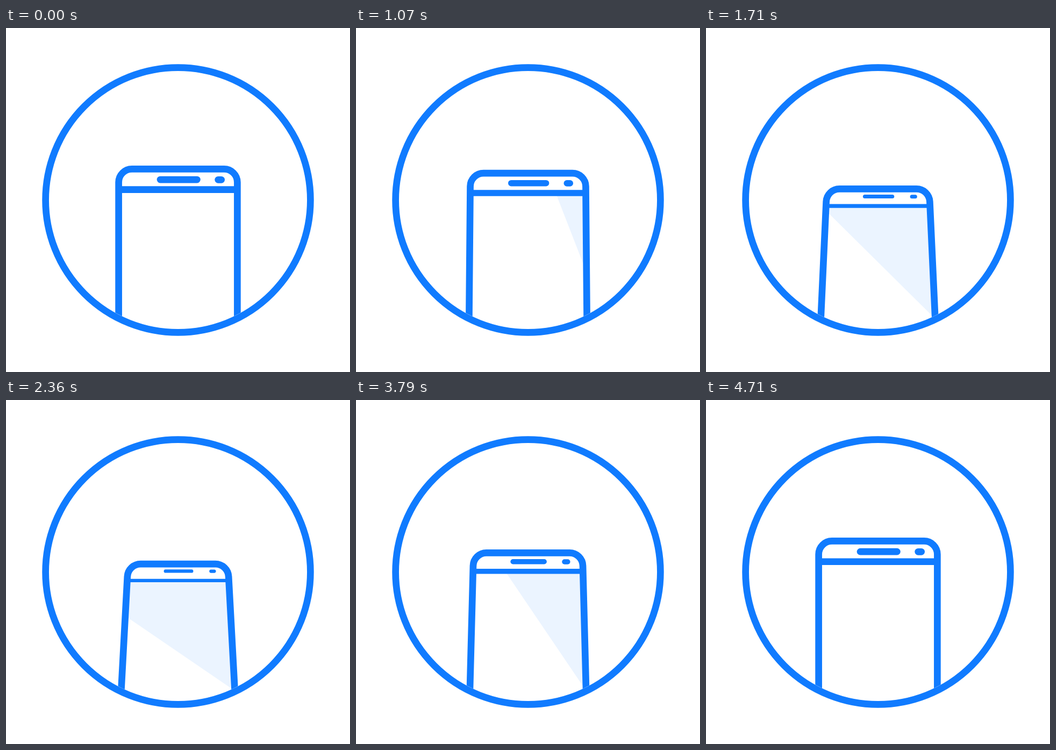
Write an HTML page with a canvas that moves like this. It is 640x640 px and loops after 4780 ms.

```html
<!DOCTYPE html>
<html lang="en">
<head>
<meta charset="utf-8">
<title>Tilting phone</title>
<style>
  html, body { margin: 0; height: 100%; overflow: hidden; background: #fff; }
  canvas { display: block; width: 640px; height: 640px; }
</style>
</head>
<body>
<canvas id="stage" width="640" height="640"></canvas>
<script>
const ctx = document.getElementById('stage').getContext('2d');
const LOOP = 4780, HALF = LOOP / 2, STEP = LOOP / 67;
const BLUE = '#107bff', LIGHT = '#ebf4ff', STROKE = 12.7, BOTTOM = 628;

const lerp = (a, b, k) => a + (b - a) * k;
const clamp = k => Math.min(1, Math.max(0, k));
const smooth = k => (k = clamp(k), k * k * (3 - 2 * k));

// Cubic bezier easing (.846, 0, .383, 1), solved by bisection
function ease(x) {
  let lo = 0, hi = 1;
  for (let i = 0; i < 24; i++) {
    const s = (lo + hi) / 2, r = 1 - s;
    if (3 * .846 * s * r * r + 3 * .383 * s * s * r + s * s * s < x) lo = s;
    else hi = s;
  }
  return smooth(lo);
}

function line(x1, x2, y, width, cap) {
  ctx.lineWidth = width;
  ctx.lineCap = cap;
  ctx.beginPath();
  ctx.moveTo(x1, y);
  ctx.lineTo(x2, y);
  ctx.stroke();
}

function drawLight(left, bar, grow) {
  const tl = left(bar), tr = 640 - tl;
  const sweep = grow * 255, down = Math.max(0, sweep - (tr - tl));
  const endY = lerp(bar, 541, clamp(grow * 2.87));
  ctx.fillStyle = LIGHT;
  ctx.beginPath();
  ctx.moveTo(tr, bar);
  ctx.lineTo(Math.max(tl, tr - sweep), bar);
  if (down) ctx.lineTo(left(bar + down), bar + down);
  ctx.lineTo(640 - left(endY), endY);
  ctx.fill();
}

function drawPhone(tilt, grow) {
  const top = lerp(262.4, 305.2, tilt), bar = lerp(300.7, 335.9, tilt);
  const corner = lerp(209.6, 227.1, tilt), thin = lerp(12.7, 6.3, tilt);
  const left = y => lerp(209.6, corner, (BOTTOM - y) / (BOTTOM - top));

  if (grow > 0) drawLight(left, bar, grow);

  const mid = lerp(282.1, 318.4, tilt), dot = lerp(397.7, 384.4, tilt);
  line(left(bar), 640 - left(bar), bar, thin, 'butt');
  line(lerp(287, 296.8, tilt), lerp(355.4, 345.3, tilt), mid, thin, 'round');
  line(dot - 3, dot + 3, mid + .2, thin, 'round');

  ctx.lineWidth = STROKE;
  ctx.beginPath();
  ctx.moveTo(209.6, BOTTOM);
  ctx.arcTo(corner, top, 320, top, 24.7);
  ctx.arcTo(640 - corner, top, 430.4, BOTTOM, 24.7);
  ctx.lineTo(430.4, BOTTOM);
  ctx.stroke();
}

function draw(time) {
  const t = Math.floor((time % LOOP + 3) / STEP) * STEP % LOOP;
  const tilt = t < HALF ? ease(t / HALF) : 1 - ease(t / HALF - 1);
  const grow = smooth((t - 588) / 1592) - smooth((t - 3057) / 1592);

  ctx.clearRect(0, 0, 640, 640);
  ctx.strokeStyle = BLUE;
  ctx.save();
  ctx.beginPath();
  ctx.arc(320, 320, 239.9, 0, 7);
  ctx.clip();
  drawPhone(tilt, grow);
  ctx.restore();

  ctx.lineWidth = STROKE;
  ctx.beginPath();
  ctx.arc(320, 320, 246.4, 0, 7);
  ctx.stroke();
}

let start;
function tick(now) {
  start ??= now;
  draw(now - start);
  requestAnimationFrame(tick);
}
draw(0);
requestAnimationFrame(tick);
</script>
</body>
</html>
```
